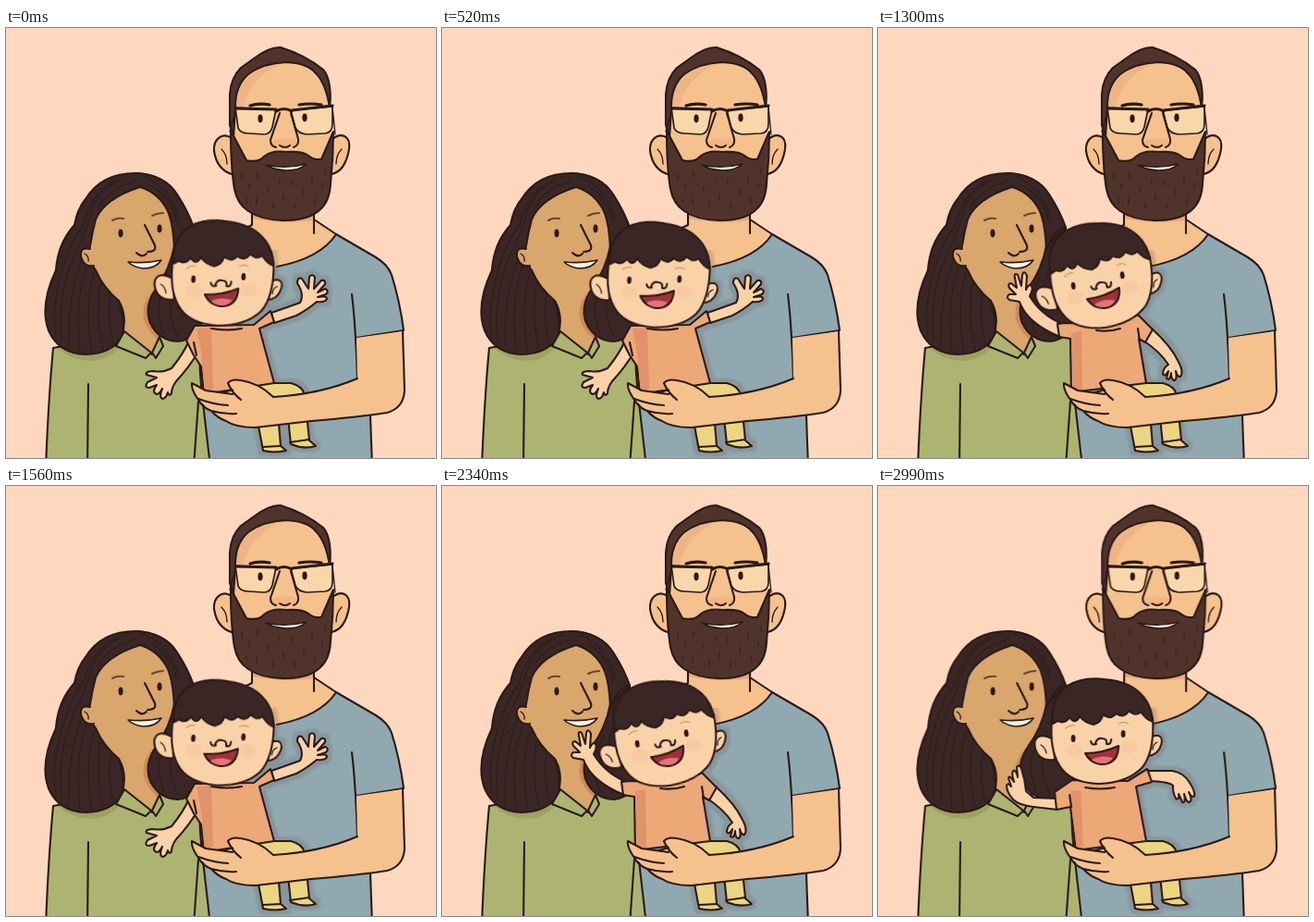
An HTML page for the animation above (3.12 s loop, 465 by 465 pixels).

```html
<!DOCTYPE html>
<html lang="en">
<head>
<meta charset="utf-8">
<title>Family portrait</title>
<style>
html, body { margin: 0; width: 100%; height: 100%; overflow: hidden; background: #fdd8bf; }
svg { display: block; width: 100vw; height: 100vh; }
path, ellipse { stroke: #2a1a18; stroke-width: 2.1; stroke-linecap: round; stroke-linejoin: round; }
.line { fill: none; }
.flat { stroke: none; }
.thin { fill: none; stroke-width: 1.3; }
.bold { fill: none; stroke-width: 3.2; }
.dad { fill: #f5c18c; }
.mom { fill: #d9a66b; }
.kid { fill: #fad2a8; }
.hair { fill: #3a2725; }
.brown { fill: #50342c; }
.blue { fill: #90a9b0; }
.green { fill: #adb471; }
.top { fill: #eda877; }
.pants { fill: #ecd580; }
.lens { fill: #fad7aa; stroke-width: 1.7; }
.teeth { fill: #fbf3e6; stroke-width: 1.6; }
.eye { fill: #2a1a18; stroke: none; }

/* every drawing holds 130 ms */
.boil { animation: boil 260ms step-end infinite; }
.reach { animation: reach 520ms step-end infinite; }
.mid { animation: mid 520ms step-end infinite; }
.wave { animation: wave 520ms step-end infinite; }
.head { transform-origin: 243px 265px; animation: head 1040ms step-end infinite; }
.open { animation: open 3120ms step-end infinite; }
.shut { animation: shut 3120ms step-end infinite; }
@keyframes boil { 0%, 100% { transform: none; } 50% { transform: translateX(.4px) skewX(-.05deg); } }
@keyframes reach { 0% { visibility: visible; } 25%, 100% { visibility: hidden; } }
@keyframes mid { 0%, 50% { visibility: hidden; } 25%, 75%, 100% { visibility: visible; } }
@keyframes wave { 0%, 75%, 100% { visibility: hidden; } 50% { visibility: visible; } }
@keyframes head {
  0% { transform: translate(-8px, 0) rotate(2.5deg); }
  12.5%, 37.5%, 62.5%, 87.5%, 100% { transform: none; }
  25%, 75% { transform: translate(-1px, 2px) rotate(-7deg); }
  50% { transform: translate(-8px, 2px) rotate(4deg); }
}
@keyframes open { 0%, 66.6667%, 100% { visibility: visible; } 62.5% { visibility: hidden; } }
@keyframes shut { 0%, 66.6667%, 100% { visibility: hidden; } 62.5% { visibility: visible; } }
</style>
</head>
<body>
<svg viewBox="0 0 465 465">
  <defs>
    <!-- soft shade the child casts on the blue shirt -->
    <filter id="halo" filterUnits="userSpaceOnUse" x="0" y="0" width="465" height="475" color-interpolation-filters="sRGB">
      <feMorphology in="SourceAlpha" operator="dilate" radius="4"/>
      <feGaussianBlur stdDeviation="1" result="fat"/>
      <feFlood x="222" y="240" width="180" height="230" flood-color="#6a4a4c" flood-opacity=".2"/>
      <feComposite in2="fat" operator="in" result="shade"/>
      <feMerge><feMergeNode in="shade"/><feMergeNode in="SourceGraphic"/></feMerge>
    </filter>
  </defs>

  <g class="boil">
    <!-- father: body -->
    <path class="dad flat" d="M266 180L266 213L250 222V275H350L357 223L333 206V180Z"/>
    <path class="flat" fill="#eaa878" d="M267 196Q300 214 333 200V208Q300 213 267 206Z"/>
    <path class="line" d="M266 190V213L254 219M333 196V222M333 207L357 223"/>
    <path class="blue flat" d="M357 223L400 248Q413 256 417 267Q426 296 430 327L379 335L381 400L394 410L396 475H214V300L240 262Q270 262 293 258Q340 249 357 223Z"/>
    <path class="line" d="M293 258Q340 249 357 223L400 248Q413 256 417 267Q426 296 430 327L379 335M374 288Q378 320 380 380M394 420L396 475"/>

    <!-- father: head -->
    <path class="dad" d="M244 119C233 112 224 121 225 133Q228 153 244 158M352 121C362 112 373 116 371 131Q367 155 352 158"/>
    <path class="thin" d="M233 131Q239 137 239 147M363 131Q357 137 357 147"/>
    <path class="dad flat" d="M245 75Q255 38 300 35Q340 40 350 80L353 150H245Z"/>
    <path class="flat" fill="#efb486" d="M247 84Q249 46 302 36Q262 54 257 85Z"/>
    <path class="brown" d="M248 88Q247 63 262 50Q278 38 303 37Q326 38 335 49Q346 60 350 86C352 70 350 53 343 45Q323 29 297 21Q285 20 268 33L254 43Q243 54 242 72V105L246 118Z"/>
    <path class="brown" d="M243 111Q243 150 247 174Q250 190 262 198Q278 209 305 208Q328 207 339 197Q350 188 351 168Q354 140 354 112Q347 128 341 142Q333 143 327 138Q321 133 303 134Q287 132 279 139Q273 146 260 143Q252 128 243 111Z"/>
    <path class="thin" d="M255 158v6M263 168v6M272 156v6M271 184v7M283 172v5M289 189v6M300 180v6M309 164v5M312 190v6M322 175v6M331 160v6M334 184v6M342 168v5M260 184v5M345 152v5M296 164v4" stroke-opacity=".6"/>
    <path class="teeth" d="M281 148Q303 153 325 147Q318 154 303 154Q288 153 281 148Z"/>
    <path class="lens" d="M248 86L251 108Q253 114 263 114L279 115Q286 115 288 107L292 88ZM308 89L313 108Q316 114 325 115L345 114Q353 113 353 104V85Z"/>
    <path class="dad flat" d="M296 90L286 120Q286 130 302 130Q317 130 316 120L308 90Z"/>
    <path class="flat" fill="#eeab7c" d="M288 122Q295 118 303 121Q311 118 315 122Q314 129 302 130Q289 130 288 122Z" opacity=".6"/>
    <path class="line" d="M296 92L286 121Q286 128 292 129M308 92L316 120Q317 127 311 129M296 127Q302 131 307 127"/>
    <path class="bold" d="M264 84Q273 81 285 83M317 83Q329 81 341 83M249 87L292 88M309 89L353 84M292 90Q301 85 309 90"/>
    <path class="thin" d="M249 87L242 112M353 85L356 115"/>
    <g class="open"><ellipse class="eye" cx="275" cy="98" rx="2.6" ry="4.4"/><ellipse class="eye" cx="323" cy="97" rx="2.6" ry="4.4"/></g>
    <path class="line shut" d="M269 99H281M318 98H329"/>

    <!-- mother -->
    <path class="hair" d="M140 157Q172 159 185 180Q196 198 203 216L200 250L170 260Z"/>
    <path class="green flat" d="M51 345L122 341L160 352L168 334H209L214 405L221 475H43Q46 400 51 345Z"/>
    <path class="flat" fill="#9fa261" d="M57 347Q70 359 92 360Q111 359 122 346L110 335H60Z"/>
    <path class="line" d="M62 344L51 346Q46 400 43 475M89 385L88 475M209 337Q209 375 213 405L221 475M208 404L203 475"/>
    <path class="mom flat" d="M142 171Q100 188 94 220L90 255Q104 285 122 298L127 328L156 352L168 335L158 315L160 285Q178 268 186 215Q178 185 142 171Z"/>
    <path class="flat" fill="#d08a56" d="M160 284Q146 296 149 314Q153 328 165 337Z"/>
    <path class="hair" d="M182 236Q177 262 162 282Q149 301 156 319Q165 338 186 339Q198 338 212 325L203 216Z"/>
    <path class="thin" d="M175 270Q158 300 171 331M184 262Q170 305 186 334" stroke-opacity=".7"/>
    <path class="hair" d="M140 157Q103 157 86 185Q77 196 74 213Q56 233 54 262Q36 300 46 327Q57 352 86 353Q115 352 125 334Q132 312 122 295Q105 281 97 262Q86 248 91 236Q93 222 97 207Q107 184 145 172Q165 178 175 198Q181 212 182 240Q192 215 203 216Q197 198 185 180Q171 158 140 157Z"/>
    <g stroke-opacity=".7">
      <path class="thin" d="M132 161Q98 172 90 206Q84 225 76 240Q55 285 60 338M120 164Q92 178 84 212Q60 245 53 300Q51 318 54 332M88 240Q67 275 68 344M88 256Q74 290 80 349M95 266Q84 300 93 351M102 276Q96 310 105 348M113 289Q109 315 116 342M148 160Q177 172 187 206M140 166Q112 172 100 194M158 171Q178 182 185 210"/>
    </g>
    <path class="mom" d="M91 239Q80 236 81 247Q84 259 95 257"/>
    <path class="thin" d="M85 244Q90 247 89 252"/>
    <path class="line" d="M122 295Q127 310 127 328L158 353"/>
    <path class="green" d="M128 328L119 344L151 357L157 351ZM166 334L158 351L162 357L170 344Z"/>
    <ellipse class="eye" cx="124" cy="222" rx="2.5" ry="4.4"/><ellipse class="eye" cx="166" cy="217" rx="2.5" ry="4.4"/>
    <path class="line" style="stroke:#6b4433" d="M115 208Q120 205 127 206M158 203Q164 200 170 200"/>
    <path class="line" d="M150 213L161 235Q163 242 153 242M141 243Q147 249 152 244"/>
    <path class="teeth" d="M132 253Q151 255 168 251Q162 260 149 260Q138 259 132 253Z"/>

    <!-- child -->
    <g filter="url(#halo)">
      <path class="pants" d="M228 397Q245 389 284 384L308 384Q320 387 323 396L328 446L335 452Q322 456 308 450L304 412L294 416L297 452L303 457Q290 460 278 457L272 425Z"/>
      <path class="line" d="M278 453L297 452M307 448L328 445M262 387Q275 395 285 397"/>

      <g class="reach">
        <path class="kid" d="M198 338Q192 352 179 368Q169 373 160 371Q150 371 152 375L163 378L153 383Q149 389 155 389L163 386Q157 394 163 396Q166 396 169 390Q165 399 169 401Q173 401 175 394Q176 399 179 395Q179 389 184 382Q198 367 208 350Z"/>
        <path class="kid" d="M287 308L318 297Q323 288 315 276Q315 269 320 271L327 282L328 269Q332 265 334 270L333 282L341 273Q346 272 345 277L337 286L345 282Q350 284 346 288L337 291Q347 289 347 293Q345 297 336 296Q327 304 314 311L290 319Z"/>
        <path class="top" d="M204 322L195 338L203 354L211 366L214 396L290 384L274 325L290 318L286 306L268 321Z"/>
        <path class="flat" fill="#e1926a" d="M206 325L222 324L224 390L215 394L211 350Z"/>
        <path class="line" d="M222 325Q240 328 255 325M203 340L206 354"/>
      </g>

      <g class="mid">
        <path class="kid" d="M193 338L168 337L160 330Q159 318 155 306Q153 300 150 304L151 315Q149 306 146 308Q144 312 147 320Q142 312 141 316L144 325Q140 320 139 324Q139 331 146 339Q152 345 168 347L194 350Z"/>
        <path class="kid" d="M292 308L318 308Q331 310 337 321Q343 330 342 335Q339 338 336 331Q341 341 336 342Q333 341 331 333Q333 343 329 342L325 333Q326 340 322 338Q318 330 319 324Q315 320 295 319Z"/>
        <path class="top" d="M210 318L191 331L193 350L208 347L214 394L290 384L279 325L296 320L291 306L270 319Z"/>
        <path class="flat" fill="#e1926a" d="M208 330L219 329L222 390L215 393L210 352Z"/>
        <path class="line" d="M224 326Q240 329 256 326M207 334L209 347"/>
      </g>

      <g class="wave">
        <path class="kid" d="M199 320Q176 310 164 290Q169 281 165 278Q162 278 160 283L161 268Q158 261 156 267L155 279L151 267Q147 264 148 270L150 281L144 276Q140 276 142 281L149 288L142 288Q138 291 142 294L153 296Q161 319 197 334Z"/>
        <path class="kid" d="M296 325Q317 344 325 361Q331 372 327 377Q324 378 322 371Q324 381 320 381Q317 380 317 373Q316 382 312 379L314 371Q310 378 308 374Q308 368 314 364Q305 350 287 338Z"/>
        <path class="top" d="M203 319L194 320L196 334L208 336L209 394L290 384L282 336L289 340L297 326L281 310L260 320Z"/>
        <path class="flat" fill="#e1926a" d="M209 330L220 328L221 390L211 393Z"/>
        <path class="line" d="M236 327Q250 329 262 325M281 325L283 338"/>
      </g>

      <g class="head">
        <path class="kid" d="M188 273C174 266 167 273 170 284Q174 298 190 296M295 272C303 267 309 271 306 280Q303 291 291 292"/>
        <path class="thin" d="M176 280Q181 283 182 289M302 277Q297 279 297 285"/>
        <path class="kid" d="M188 252Q185 285 196 302Q207 321 239 322Q270 321 286 304Q299 287 297 252Q280 215 240 215Q200 217 188 252Z"/>
        <g fill="#f5b48c" fill-opacity=".25"><ellipse class="flat" cx="212" cy="286" rx="9" ry="7"/><ellipse class="flat" cx="271" cy="282" rx="9" ry="7"/></g>
        <path class="hair" d="M189 257Q185 230 205 216Q221 206 245 209Q273 211 287 228Q296 239 297 255Q289 252 284 244Q279 250 271 243Q266 252 257 246Q251 254 243 247Q242 255 233 258Q223 256 218 249Q213 259 207 250Q202 258 194 254Z"/>
        <ellipse class="eye" cx="211" cy="273" rx="2.4" ry="4"/><ellipse class="eye" cx="265" cy="268" rx="2.4" ry="4"/>
        <path class="thin" style="stroke:#c99a72" d="M203 262Q207 258 212 259M260 257Q265 254 270 257"/>
        <path class="line" d="M230 276Q231 281 236 279M235 278Q237 272 242 273Q248 273 247 279M247 279Q252 280 252 274"/>
        <path fill="#9f3237" d="M224 289Q243 289 260 281Q260 299 244 301Q230 301 224 289Z"/>
        <path class="flat" fill="#e4747a" d="M231 296Q241 290 254 294Q250 300 243 300Q235 300 231 296Z"/>
      </g>
    </g>

    <!-- father: arm around the child -->
    <path class="dad flat" d="M379 335L429 328L431 392Q430 411 412 416Q380 421 330 425L270 432Q248 432 238 425L222 414L208 402Q200 391 201 384L216 392L245 396L254 401L240 384Q244 379 254 381Q274 384 289 399Q340 396 380 380Z"/>
    <path class="line" d="M429 328L431 392Q430 411 412 416Q380 421 330 425L270 432Q248 432 238 425Q229 422 222 414Q213 411 208 402Q200 391 201 384L216 392L245 396M254 402Q244 394 240 384Q244 379 254 381Q274 384 289 399Q340 396 380 379M208 401Q224 407 240 408M222 414Q236 418 249 417"/>
  </g>
</svg>
</body>
</html>
```
